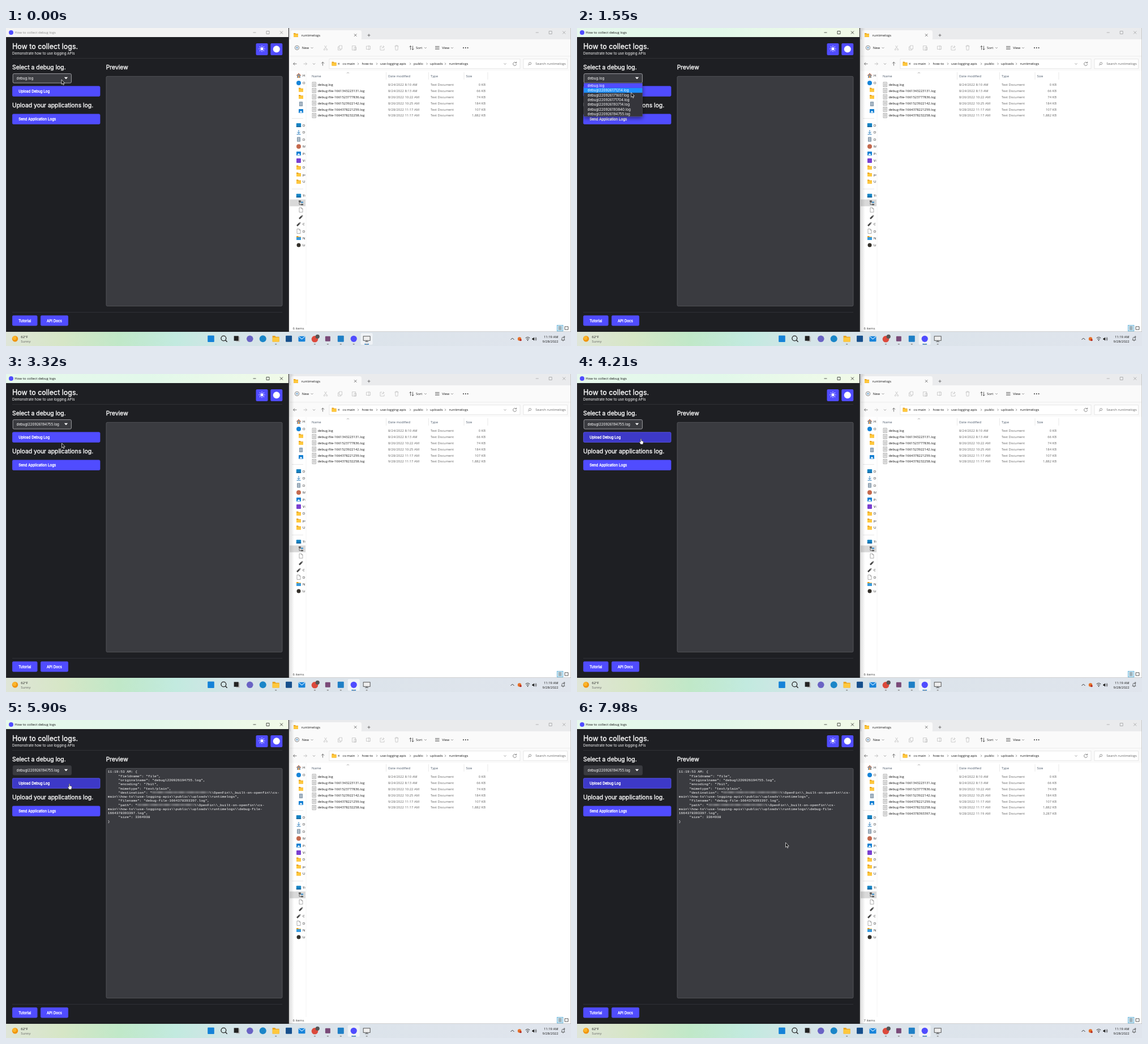
Recreate the animation shown at these times as an HTML page. Size 998x561 px, loop 8 s.

```html
<!DOCTYPE html>
<html lang="en">
<head>
<meta charset="utf-8">
<title>How to collect debug logs</title>
<style>
html, body { margin: 0; width: 100%; height: 100%; overflow: hidden; background: #fff; }
svg { display: block; width: 100%; height: 100%; }
text { white-space: pre; font: 5.9px "Open Sans", sans-serif; }
.app { font-family: Inter, sans-serif; font-size: 6.24px; fill: #fff; }
.bold { stroke: #fff; stroke-width: .32px; }
.mono { font-family: "Liberation Mono", monospace; font-size: 6.24px; fill: #fff; }
</style>
</head>
<body>
<svg id="stage" viewBox="0 0 998 561"></svg>
<script>
const PURPLE = '#504cff', PANEL = '#3a3b40', GREY = '#626262', INK = '#151515';

const rect = (x, y, w, h, fill, extra = '') =>
  `<rect x="${x}" y="${y}" width="${w}" height="${h}" fill="${fill}" ${extra}/>`;
const circle = (x, y, r, fill, extra = '') => `<circle cx="${x}" cy="${y}" r="${r}" fill="${fill}" ${extra}/>`;
const line = (d, color = '#555', width = .7, extra = '') =>
  `<path d="${d}" fill="none" stroke="${color}" stroke-width="${width}" ${extra}/>`;
const shape = (d, fill) => `<path d="${d}" fill="${fill}"/>`;
const text = (x, y, s, fill = INK, size = 5.9, extra = '') =>
  `<text x="${x}" y="${y}" fill="${fill}" style="font-size:${size}px" ${extra}>${s}</text>`;
const app = (x, y, s, size = 6.24, bold = false) =>
  `<text class="app${bold ? ' bold' : ''}" x="${x}" y="${y}" style="font-size:${size}px">${s}</text>`;
const group = (id, body, extra = '') => `<g id="${id}" ${extra}>${body}</g>`;

const folder = (x, y, c = '#ffc83d', k = 1) => `<g transform="translate(${x} ${y}) scale(${k})">` +
  shape('M-4-3.5h3l1 1.2h4v5.8h-8z', '#e8a31f') + rect(-4, -1.6, 8, 5, c, 'rx=".5"') + '</g>';
const page = (x, y) =>
  shape(`M${x - 3} ${y - 4}h4l2 2v6h-6z`, '#fff') + line(`M${x - 3} ${y - 4}h4l2 2v6h-6zM${x + 1} ${y - 4}v2h2`, '#777', .6);
const notes = (x, y) => rect(x - 3, y - 4, 6, 8, '#7d93a6', 'rx=".6"') +
  line(`M${x - 2} ${y - 2}h4m-4 2h4m-4 2h4`, '#fff', .7);
const picture = (x, y) => rect(x - 4, y - 3.5, 8, 7, '#1380d3', 'rx=".8"') +
  shape(`M${x - 3} ${y + 2.8}l3-3.4l3 3.4z`, '#fff');
const screen = (x, y) => rect(x - 4.2, y - 3.5, 8.4, 6.6, '#1684c4', 'rx=".8"') + rect(x - 4.2, y + 1.6, 8.4, 1.5, '#0d5c96');
const drive = (x, y) => line(`M${x - 3} ${y - 4}v7h3M${x - 3} ${y - 1}h3`, '#444') +
  rect(x - 4, y - 4, 4, 2, '#444') + rect(x, y - 2, 4, 2, '#3088c8') + rect(x, y + 2, 4, 2, '#444');
const pen = (x, y) => line(`M${x - 3} ${y + 3}l5-5`, '#444', 2.6) + line(`M${x + 1} ${y - 1}l2.2-2.2`, '#888', 1.8);
const house = (x, y) => shape(`M${x - 4} ${y}l4-4l4 4h-1v4h-6v-4z`, '#8b96a0') + rect(x - 1, y + .6, 2, 3.4, '#f2a04a') +
  line(`M${x - 4} ${y}l4-4l4 4`, '#d9683c', .9);
const download = (x, y) => line(`M${x} ${y - 4}v6m-2.5-2.5l2.5 2.5l2.5-2.5m-6 4h7`, '#1a73b8', .9);
const dot = (color, r = 4) => (x, y) => circle(x, y, r, color);
const square = (color, r = 4) => (x, y) => rect(x - r, y - r, 2 * r, 2 * r, color, 'rx="1"');

const windowButtons = (x, color) =>
  line(`M${x} 8h5m18.5-2.5h5v5h-5zM${x + 47.5} 5.5l5 5m0-5l-5 5`, color, .7);
const button = (x, y, w, label, tx, id = '') =>
  rect(x + .4, y + .4, w - .8, 17.6, PURPLE, `rx="1.8" stroke="${PURPLE}" stroke-width=".8" ${id}`) +
  app(tx, y + 11.6, label, 6.24, true);

// ----- left window -----
const options = ['debug.log', ...['171214', '171607', '171704', '193714', '193840', '194755'].map(n => `debugl220926${n}.log`)];
const OPTION_TOP = 97.5, OPTION_H = 8.36;

const titleBar = (bg, color) => rect(0, 0, 499, 16, bg) + circle(9, 8, 4, PURPLE) +
  text(15.3, 10.4, 'How to collect debug logs', color, 6.12) + windowButtons(436.5, color);

const sunRays = Array.from({ length: 8 }, (_, i) => {
  const a = i * Math.PI / 4, c = Math.cos(a), s = Math.sin(a);
  return `M${452 + 3.9 * c} ${36.7 + 3.9 * s}L${452 + 5.4 * c} ${36.7 + 5.4 * s}`;
}).join('');

const previewLines = [
  '11:19:53 AM: {',
  '     "fieldname": "file",',
  '     "originalname": "debugl220926194755.log",',
  '     "encoding": "7bit",',
  '     "mimetype": "text/plain",',
  '     "destination": "' + ' '.repeat(27) + '\\\\OpenFin\\\\_built-on-openfin\\\\cs-',
  'main\\\\how-to\\\\use-logging-apis\\\\public\\\\uploads\\\\runtimelogs",',
  '     "filename": "debug-file-1664378393397.log",',
  '     "path": "' + ' '.repeat(27) + '\\\\OpenFin\\\\_built-on-openfin\\\\cs-',
  'main\\\\how-to\\\\use-logging-apis\\\\public\\\\uploads\\\\runtimelogs\\\\debug-file-',
  '1664378393397.log",',
  '     "size": 3364938',
  '}'];
const smear = (x, y) => line(`M${x} ${y}h101`, '#c9c9cc', 3, 'stroke-dasharray="6 2 11 3 4 1 9 2" filter="url(#soft)" opacity=".6"');
const preview = previewLines.map((s, i) => `<text class="mono" x="179.7" y="${93.4 + i * 7.28}">${s}</text>`).join('') +
  smear(258.5, 127.8) + smear(232.5, 149.8);

const dropdown = rect(12, 97, 103.5, 59, '#35363b', 'stroke="#55565b" stroke-width=".5" filter="url(#shadow)"') +
  group('chosen', rect(12, OPTION_TOP, 103.5, OPTION_H, PURPLE)) +
  rect(12, 0, 103.5, OPTION_H, '#1e90ff', 'id="hover"') +
  options.map((s, i) => app(18.6, OPTION_TOP + 6.4 + i * OPTION_H, s)).join('');

const leftWindow = rect(0, 0, 500, 536, '#1e1f23') +
  group('inactive', titleBar('#f3f3f3', '#8a8a8a')) + group('active', titleBar('url(#mint)', '#111')) +
  app(11, 37, 'How to collect logs.', 12.48, true) +
  app(11, 46.8, 'Demonstrate how to use logging APIs') +
  line('M11 53.5H488M11 501.5H488', '#35363b', .8) +
  rect(441.5, 27, 21, 21, PURPLE, 'rx="2"') + rect(467.3, 27, 21, 21, PURPLE, 'rx="2"') +
  circle(452, 36.7, 2.6, '#fff') + line(sunRays, '#fff', 1.1) + circle(477.8, 37.3, 6, '#fff') +
  app(11, 73.4, 'Select a debug log.', 10.4, true) + app(176.7, 73.4, 'Preview', 10.4, true) +
  rect(12.2, 80.6, 103.2, 16.4, PANEL, 'id="select" rx="2" stroke-width=".9"') +
  `<text id="selected" class="app" x="18.6" y="91"></text>` + shape('M102.8 86.8h6.4l-3.2 3.4z', '#fff') +
  button(11, 102.4, 155.4, 'Upload Debug Log', 22.3, 'id="upload"') +
  app(11, 140, 'Upload your applications log.', 10.4, true) +
  button(11, 151.5, 155.4, 'Send Application Logs', 22.3) +
  rect(177, 85.3, 311, 405.3, PANEL, 'rx="2" stroke="#5b5c61" stroke-width=".8"') +
  button(11, 507, 44.5, 'Tutorial', 22.3) + button(61, 507, 49, 'API Docs', 72) +
  group('preview', preview) + group('dropdown', dropdown) +
  line('M.3 16V536M499.3 0V536', '#4a4a4c', .8);

// ----- file manager -----
const nav = [
  [house, 84, 'H'], [dot('#1684d8'), 97, 'O'], [folder, 109], [folder, 121.5], [notes, 134], [picture, 146.5],
  [screen, 171.5, 'D'], [download, 184, 'D'], [notes, 196.5, 'D'], [dot('#c4694d'), 209, 'M'], [picture, 221.5, 'Pi'],
  [square('#7a3fd0'), 234, 'Vi'], [folder, 246, 'D'], [folder, 258.5, 'pr'], [folder, 271, 'U'],
  [screen, 296, 'Th'], [drive, 308.5], [page, 321], [pen, 333.5], [pen, 346, 'C'], [page, 358.5, 'D'],
  [(x, y) => folder(x, y, '#3a9bdc'), 370.5, 'N'], [dot('#33302a', 3.5), 383, 'Li']];
const files = [
  ['debug.log', '8/24/2022 8:10 AM', '0 KB'],
  ['debug-file-1661343223131.log', '8/24/2022 8:13 AM', '66 KB'],
  ['debug-file-1661523777836.log', '8/26/2022 10:22 AM', '74 KB'],
  ['debug-file-1661523922142.log', '8/26/2022 10:25 AM', '184 KB'],
  ['debug-file-1664378221259.log', '9/28/2022 11:17 AM', '107 KB'],
  ['debug-file-1664378232258.log', '9/28/2022 11:17 AM', '1,882 KB'],
  ['debug-file-1664378393397.log', '9/28/2022 11:19 AM', '3,287 KB']];
const fileRow = ([name, date, size], i) => {
  const y = 99.7 + i * 10.93, base = y + 2.1;
  return group('file' + i, rect(541, y - 4, 6.5, 8, '#f4f4f4', 'stroke="#8a8a8a" stroke-width=".6"') +
    line(`M542.3 ${y - 1.8}h4m-4 1.8h4m-4 1.8h4`, '#8a8a8a', .6) +
    text(550.5, base, name) + text(675, base, date, GREY) + text(750, base, 'Text Document', GREY, 5.82) +
    text(847, base, size, GREY, 5.9, 'text-anchor="end"'));
};
const chevron = (x, y, c = '#777') => line(`M${x - 2} ${y - 1}l2 2l2-2`, c, .7);
const crumbs = [[594.5, 'cs-main'], [628.5, 'how-to'], [661, 'use-logging-apis'], [720, 'public'], [749, 'uploads'], [782.5, 'runtimelogs']];

const toolbar =
  circle(514, 34.8, 3.7, 'none', 'stroke="#555" stroke-width=".7"') + line('M512 34.8h4m-2-2v4', '#2878b8') +
  text(522.8, 37, 'New') + chevron(540.5, 35) +
  line('M562.5 31l4 6m0-6l-4 6', '#bbb') + circle(562.3, 38, 1.2, 'none', 'stroke="#bbb" stroke-width=".6"') +
  circle(566.7, 38, 1.2, 'none', 'stroke="#bbb" stroke-width=".6"') +
  line('M588.5 31h5v6h-5zM588.5 33h-2v6h5v-2M611.5 31.5h6v7.5h-6zM615 34h3.5v5H615zM636.5 32h7v5.5h-7zM641 30.5v8.5M664 32h-3v7h7v-3M664 36q0-3 4-3m-2-2l2 2l-2 2M686.5 32h7m-6 0l.6 7h3.8l.6-7m-4 0v-1.3h3V32', '#bbb') +
  line('M714.5 31.5v7m-2-5l2-2l2 2M718.5 31.5v7m-2-2l2 2l2-2M758 32.5h7.5m-7.5 2.4h7.5m-7.5 2.4h7.5', '#444', .8) +
  text(724, 37, 'Sort') + chevron(741, 35) + text(770.3, 37, 'View') + chevron(788, 35) +
  [808, 811.8, 815.6].map(x => circle(x, 35, .9, '#222')).join('') +
  line('M501 49.8H998', '#e5e5e5', .6);

const addressBar = line('M513.5 63.2h-6m2.5-2.5l-2.5 2.5l2.5 2.5M559.5 66.5v-6.5m-2.6 2.6l2.6-2.6l2.6 2.6', '#444') +
  line('M525.5 63.2h6m-2.5-2.5l2.5 2.5l-2.5 2.5', '#aaa') + chevron(544, 63.3) +
  rect(571, 54.8, 337, 17, '#fff', 'stroke="#ddd" stroke-width=".7"') + folder(579.5, 63) +
  text(586, 65, '«', INK, 7) + crumbs.map(([x, s]) => text(x, 65.3, s, INK, 6.05)).join('') +
  [622, 655, 714, 743.5, 776].map(x => line(`M${x - .8} 61.5l1.6 1.7l-1.6 1.7`, '#555')).join('') +
  chevron(881.5, 63.3) + line('M901 61.5a3 3 0 1 0 .6 2.2m.1-4.2v2.2h-2.2', '#555') +
  rect(914, 54.8, 77.5, 17, '#fff', 'stroke="#ddd" stroke-width=".7"') +
  circle(925.6, 62.6, 2, 'none', 'stroke="#555" stroke-width=".6"') + line('M924.2 64l-2 2', '#555') +
  text(935.3, 65.3, 'Search runtimelogs', GREY, 5.95);

const rightWindow = rect(500, 0, 498, 536, '#fff') + rect(500, 0, 498, 20, '#eaebed') +
  rect(503, 4, 125, 17, '#fafafa', 'rx="3"') + rect(500, 20, 498, 55.5, '#fafafa') +
  folder(512, 12.4) + text(521.5, 14.9, 'runtimelogs', INK, 6) +
  line('M615 10.4l4.4 4.4m0-4.4l-4.4 4.4M638.5 12.8h5m-2.5-2.5v5', '#444') + windowButtons(935.7, '#999') +
  toolbar + addressBar +
  rect(501, 302.5, 28, 12, '#d9d9d9') + line('M505 159.5h20M505 284h20', '#ddd') +
  `<g clip-path="url(#nav)">` + nav.map(([icon, y, label]) =>
    icon(label ? 517 : 521, y) + (label ? text(524, y + 2.2, label) : '')).join('') + '</g>' +
  line('M530 76V524', '#eee', .6) + line('M602 80l2-1.7l2 1.7', '#777', .6) +
  [[540, 'Name'], [675, 'Date modified'], [750, 'Type'], [812.5, 'Size']].map(([x, s]) => text(x, 86.8, s, '#4c5a6b')).join('') +
  line('M671.5 78V91M746.5 78V91M809 78V91M851 78V91', '#e0e0e0') +
  files.map(fileRow).join('') +
  `<text id="count" x="506.5" y="531.8" fill="#444"></text>` +
  rect(973.3, 524.3, 10.6, 10.4, '#cce8f5', 'stroke="#4aa3cf" stroke-width=".7"') +
  line('M975.8 527h5.6m-5.6 2.4h5.6m-5.6 2.4h5.6', '#333') + line('M987 526.8h6v5.2h-6z', '#333', .8) +
  line('M997.6 0V536M500 535.6H998', '#aaa', .6) +
  rect(500, 0, 9, 536, 'url(#edge)', 'id="windowShadow"');

// ----- taskbar -----
const taskIcons = [
  square('#1583d8', 5.8),
  (x, y) => circle(x - .6, y - .8, 4.4, 'none', 'stroke="#222" stroke-width="1.3"') + line(`M${x + 2.5} ${y + 2.3}l3.2 3.2`, '#222', 1.4),
  (x, y) => rect(x - 1.5, y - 4, 6.5, 9, '#bbb') + rect(x - 5.2, y - 5, 8, 8.5, '#222'),
  dot('#6a63c4', 5.8), dot('#1a86c8', 6), (x, y) => folder(x, y, '#ffc83d', 1.5), square('#164f8c', 5.5),
  (x, y) => rect(x - 6, y - 4.5, 12, 9.5, '#1783da', 'rx="1"') + line(`M${x - 5.5} ${y - 4}l5.5 4.5l5.5-4.5`, '#bfe4ff', 1.1),
  (x, y) => circle(x, y + .5, 5.8, '#dc4a3c') + circle(x + 4.8, y - 4, 3.6, '#555'),
  square('#7a4a78', 4.5), square('#1f7fc6', 5.5), dot(PURPLE, 5.6),
  (x, y) => rect(x - 6, y - 4.5, 12, 7.5, '#eee', 'stroke="#444" stroke-width=".9"') + line(`M${x} ${y + 3}v2m-3 0h6`, '#444', .9)];
const iconX = i => 362 + i * 22.93;
const activeTask = (id, i) => group(id, rect(iconX(i) - 10.5, 538.3, 21, 20.5, '#fff', 'rx="2" opacity=".55"') +
  rect(iconX(i) - 4, 557, 8, 1.5, '#1574c4', 'rx=".7"'));

const taskbar = rect(0, 536, 998, 25, 'url(#bar)') + circle(16, 548.3, 5.2, '#f0940e') + circle(15, 547, 3.4, '#fbb62b') +
  text(26.3, 546.7, '62°F') + text(26.3, 554.9, 'Sunny', GREY) +
  activeTask('taskBefore', 12) + activeTask('taskAfter', 11) +
  [5, 8, 9, 10, 11, 12].map(i => rect(iconX(i) - 1.6, 557, 3.2, 1.4, '#888', 'rx=".7"')).join('') +
  taskIcons.map((icon, i) => icon(iconX(i), 548.3)).join('') +
  line('M891.5 550l3-3l3 3', '#222', .9) + circle(907, 548.5, 3.2, '#e5702a') + circle(909, 550.5, 1.8, '#b52a20') +
  line('M917.7 547q3.8-3.2 7.6 0M919.2 549q2.3-2 4.6 0', '#222', .9) + circle(921.5, 550.8, .9, '#222') +
  shape('M929.5 547.2h1.6l2-1.8v6.4l-2-1.8h-1.6z', '#222') + line('M934.6 546.8q1.2 1.7 0 3.5m1.3-4.9q2.2 3.2 0 6.3', '#222') +
  text(975.5, 546.7, '11:19 AM', INK, 5.9, 'text-anchor="end"') + text(975.5, 554.9, '9/28/2022', INK, 5.9, 'text-anchor="end"') +
  line('M981 550.5q1-1 1-3q.2-2.2 2-2.2t2 2.2q0 2 1 3zm2 1.3h2M985 544h2.2l-2 2h2.2', '#333');

const cursors =
  group('arrow', '<path d="M0 0V8.3L1.9 6.6L3.2 9.6L4.5 9L3.2 6.2H5.8Z" fill="#111" stroke="#fff" stroke-width=".7"/>') +
  group('hand', '<path d="M-.8 .6q.8-1.2 1.6 0v3.2l2.6.7q1.1.4.9 1.6l-.8 4H-.6l-2.2-3.8q0-1.3 1.1-.9l.9.8z" fill="#fff" stroke="#222" stroke-width=".6"/>');

const stop = (o, c, a = 1) => `<stop offset="${o}" stop-color="${c}" stop-opacity="${a}"/>`;
document.getElementById('stage').innerHTML = `<defs>
  <linearGradient id="mint">${stop(0, '#e6f8ec')}${stop(.5, '#e2f8ea')}${stop(1, '#f1fae8')}</linearGradient>
  <linearGradient id="bar">${stop(0, '#dfe5d8')}${stop(.1, '#d6e6c6')}${stop(.2, '#c0e8c8')}${stop(.3, '#c2eadf')}${stop(.4, '#d4e4e8')}${stop(.55, '#dbe3ea')}${stop(1, '#e0e5ed')}</linearGradient>
  <linearGradient id="edge">${stop(0, '#000', .14)}${stop(1, '#000', 0)}</linearGradient>
  <filter id="soft" filterUnits="userSpaceOnUse" x="220" y="118" width="150" height="40"><feGaussianBlur stdDeviation="2.2 1.1"/></filter>
  <filter id="shadow" filterUnits="userSpaceOnUse" x="0" y="80" width="140" height="100"><feDropShadow dx="0" dy="3" stdDeviation="3.5" flood-opacity=".5"/></filter>
  <clipPath id="nav"><rect x="500" y="76" width="28.5" height="450"/></clipPath></defs>` +
  leftWindow + rightWindow + taskbar + cursors;

// ----- timeline -----
const LOOP = 8000;
const FOCUS = 70, OPEN = 140, CHOOSE = 2600, CLICK = 5000, RESPONSE = 5070, FILE_ADDED = 6110;
const path = [ // time, x, y of the pointer tip
  [0, 98, 91], [600, 98, 91], [780, 96, 103], [1410, 96, 110], [2130, 92.5, 148], [3000, 92.5, 148],
  [3320, 98.5, 122], [3780, 113, 113], [3900, 113, 113], [4190, 113, 114], [4500, 113, 114], [4800, 112, 113.5],
  [5900, 112, 112.3], [6660, 112, 113], [7420, 365, 217], [7540, 365, 217], [7960, 368.5, 216.2]];

const $ = id => document.getElementById(id);
const show = (id, on) => $(id).setAttribute('display', on ? 'inline' : 'none');

function pointer(t) {
  const i = path.findIndex(k => k[0] > t);
  if (i < 0) return path[path.length - 1].slice(1);
  const [t0, x0, y0] = path[i - 1], [t1, x1, y1] = path[i];
  let p = (t - t0) / (t1 - t0);
  if (t1 - t0 > 700) p = p * p * (3 - 2 * p);
  return [x0 + (x1 - x0) * p, y0 + (y1 - y0) * p];
}

function render(t) {
  const [x, y] = pointer(t);
  const focused = t >= FOCUS, open = t >= OPEN && t < CHOOSE;
  const overUpload = !open && x > 11 && x < 166.4 && y > 102.4 && y < 120.8;
  const option = Math.max(0, Math.min(6, Math.floor((y - OPTION_TOP) / OPTION_H)));

  show('inactive', !focused);
  show('active', focused);
  show('windowShadow', focused);
  show('taskBefore', !focused);
  show('taskAfter', focused);
  show('dropdown', open);
  $('hover').setAttribute('y', OPTION_TOP + option * OPTION_H);
  $('selected').textContent = options[t < CHOOSE ? 0 : 6];
  $('select').setAttribute('stroke', t < CLICK ? '#a9a9ad' : PANEL);
  const dark = overUpload || t >= CLICK;
  $('upload').setAttribute('fill', dark ? '#3d39c8' : PURPLE);
  $('upload').setAttribute('stroke', dark ? '#5f5bf0' : PURPLE);
  show('preview', t >= RESPONSE);
  show('file6', t >= FILE_ADDED);
  $('count').textContent = (t < FILE_ADDED ? 6 : 7) + ' items';

  for (const id of ['arrow', 'hand']) {
    show(id, (id === 'hand') === overUpload);
    $(id).setAttribute('transform', `translate(${x} ${y})`);
  }
}

const start = performance.now();
function tick() {
  render((performance.now() - start) % LOOP);
  requestAnimationFrame(tick);
}
tick();
</script>
</body>
</html>
```
